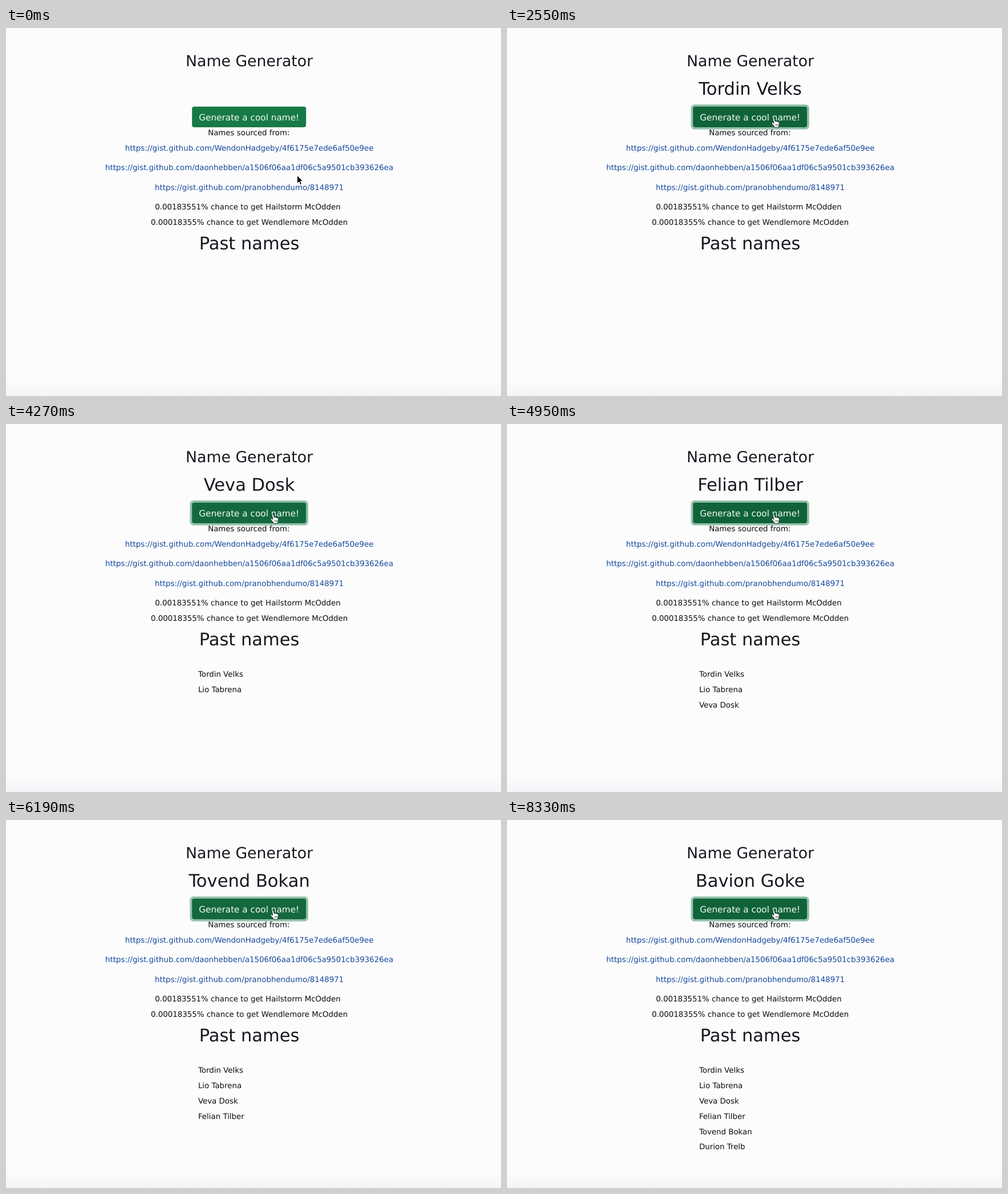
These frames come from a looping animation (868x645 px, 8350 ms). An HTML page:

```html
<!DOCTYPE html>
<html lang="en">
<head>
<meta charset="utf-8">
<title>Name Generator</title>
<style>
  html, body { margin: 0; width: 100%; height: 100%; overflow: hidden; background: #fcfcfd; }
  svg { display: block; font: 13.37px "DejaVu Sans", sans-serif; text-rendering: geometricPrecision; }
  text { fill: #0c0c12; text-anchor: middle; }
  .title { font-size: 26.74px; fill: #16181e; }
  .big { font-size: 30.56px; fill: #16181e; }
  .link { fill: #15489a; }
  .label { font-size: 15.28px; fill: #f4faf6; }
  .past { text-anchor: start; }
</style>
</head>
<body>
<svg id="stage" width="868" height="645" viewBox="0 0 868 645">
  <defs>
    <linearGradient id="fade" x2="0" y2="1">
      <stop offset="0" stop-color="#f5f5f9" stop-opacity="0"/>
      <stop offset="1" stop-color="#f5f5f9"/>
    </linearGradient>
  </defs>
  <rect y="617" width="868" height="28" fill="url(#fade)"/>
  <rect id="ring" x="322.4" y="133.9" width="207.6" height="43.8" rx="6.5" fill="#94c3ac"/>
  <rect id="button" x="326.2" y="137.7" width="200" height="36.2" rx="3.8"/>
  <g id="copy"></g>
  <path id="arrow" d="M0 0V14.2L3.3 11.2L5.5 16.2L7.8 15.2L5.7 10.3H10Z"
        fill="#000" stroke="#fff" stroke-width=".9"/>
  <g id="hand" stroke="#16231c" stroke-width=".9" stroke-linejoin="round">
    <path fill="#fff" d="M0 9L-1.6 1.6Q-1.8 0-.4-.2Q.8-.3 1.1 1L2.2 5.6Q3.4 4.4 4.6 5.7Q6 4.8 7 6.2
      Q8.6 5.6 9.2 7.4Q9.8 10 8.8 12.4L8.4 16H1.6Q.6 13.6-1.6 11.6L-4 8.8Q-4.6 7.2-3 7.2Q-1.6 7.4 0 9Z"/>
    <path fill="none" stroke-width=".7" d="M3 10.2L3.5 13.3M5 10L5.3 13.2M6.9 9.8L7.1 13"/>
  </g>
</svg>
<script>
const LOOP = 8350, FIRST_CLICK = 1610, CLICK_GAP = 1100;
const CENTER = 426.6, LINE = 26.8;
const names = ['Tordin Velks', 'Lio Tabrena', 'Veva Dosk', 'Felian Tilber',
  'Tovend Bokan', 'Durion Trelb', 'Bavion Goke'];
const $ = id => document.getElementById(id);

function addText(content, y, className = '', x = CENTER) {
  const el = document.createElementNS('http://www.w3.org/2000/svg', 'text');
  el.setAttribute('x', x);
  el.setAttribute('y', y);
  el.setAttribute('class', className);
  el.textContent = content;
  return $('copy').appendChild(el);
}

const gist = 'https://gist.github.com/';
addText('Name Generator', 66.8, 'title');
addText('Generate a cool name!', 161.5, 'label', 426.2);
addText('Names sourced from:', 188, '', 425.8);
addText(gist + 'WendonHadgeby/4f6175e7ede6af50e9ee', 214.7, 'link');
addText(gist + 'daonhebben/a1506f06aa1df06c5a9501cb393626ea', 249.2, 'link');
addText(gist + 'pranobhendumo/8148971', 283.7, 'link');
addText('0.00183551% chance to get Hailstorm McOdden', 318.3, '', 424);
addText('0.00018355% chance to get Wendlemore McOdden', 345.1);
addText('Past names', 388, 'big');
const current = addText('', 117, 'big');
const past = names.slice(0, -1).map((name, i) => addText(name, 443.4 + i * LINE, 'past', 336.9));

const progress = (t, from, to) => Math.min(1, Math.max(0, (t - from) / (to - from)));
const ease = p => p * p * (3 - 2 * p);
const mix = (a, b, p) => a + (b - a) * p;
const blend = (a, b, p) => `rgb(${a.map((v, i) => Math.round(mix(v, b[i], p)))})`;
const IDLE = [23, 122, 70], HOVER = [19, 105, 62], PRESSED = [16, 99, 56];

// How far the button is pressed: held around each click, then released.
function pressAmount(t) {
  return Math.max(...names.map((_, i) => {
    const dt = t - FIRST_CLICK - i * CLICK_GAP;
    return progress(dt, -240, -200) * (1 - progress(dt, 130, 190));
  }));
}

function draw(now) {
  const t = now % LOOP;
  const drift = ease(progress(t, 20, 400)), approach = ease(progress(t, 750, 1120));
  const x = mix(mix(510.6, 505, drift), 468, approach);
  const y = mix(mix(258.3, 236, drift), 158.3, approach);
  const over = y < 174;
  for (const [id, shown] of [['arrow', !over], ['hand', over]]) {
    $(id).setAttribute('transform', `translate(${x} ${y})`);
    $(id).style.display = shown ? '' : 'none';
  }
  $('ring').style.opacity = progress(t, 1370, 1450);
  const press = pressAmount(t);
  $('button').style.fill = press ? blend(HOVER, PRESSED, press)
    : blend(IDLE, HOVER, progress(t, 950, 1100));

  const clicks = Math.max(0, Math.floor((t - FIRST_CLICK) / CLICK_GAP) + 1);
  current.textContent = names[clicks - 1] || '';
  past.forEach((el, i) => el.style.display = i < clicks - 1 ? '' : 'none');
}

const start = performance.now();
function tick() {
  draw(performance.now() - start);
  requestAnimationFrame(tick);
}
tick();
</script>
</body>
</html>
```
